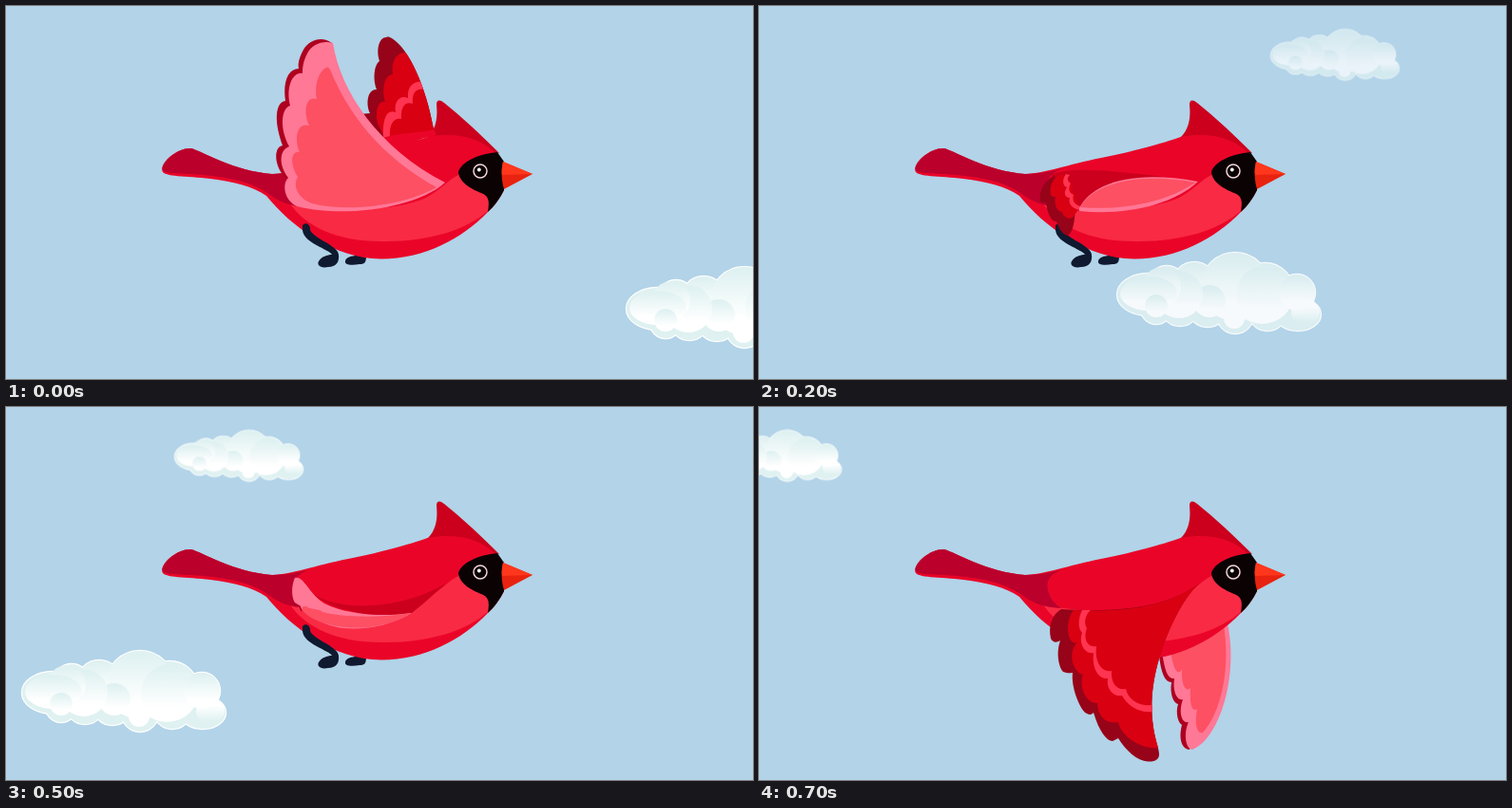
Animation, 786 px wide and 393 px high, one loop 800 ms. Source, as an HTML page without scripts:

```html
<!DOCTYPE html>
<html lang="en">
<head>
<meta charset="utf-8">
<title>Flying cardinal</title>
<style>
html, body { margin: 0; width: 100%; height: 100%; overflow: hidden; background: #b2d3e8; }
svg { display: block; width: 100vw; height: 100vh; }

.red { fill: #ea0528; }
.belly { fill: #f92a44; }
.crest { fill: #cc001d; }
.tail { fill: #bb002c; }
.navy { fill: #0f192f; }
.edge { fill: #ae001f; }
.pink { fill: #ff7896; }
.rose { fill: #fd5063; }
.tip { fill: #970318; }
.wing { fill: #d90012; }
.band { fill: #ff3450; }

/* Four wing poses, 100 ms each */
.pose { visibility: hidden; animation: flap 400ms step-end infinite; }
.up { animation-delay: -400ms; }
.fold { animation-delay: -300ms; }
.sweep { animation-delay: -200ms; }
.down { animation-delay: -100ms; }
@keyframes flap { 0% { visibility: visible; } 25%, 100% { visibility: hidden; } }

.near { animation: near 800ms step-end infinite; }
.far { animation: far 800ms step-end infinite; }
@keyframes near {
  0% { transform: translate(652px, 274px); opacity: 1; }
  12.5% { transform: translate(514px, 266px); opacity: .95; }
  25% { transform: translate(376px, 259px); opacity: .9; }
  37.5% { transform: translate(206px, 256px); opacity: 1; }
  50% { transform: translate(96px, 256px); opacity: 1; }
  62.5% { transform: translate(16px, 256px); opacity: 1; }
  75% { transform: translate(-64px, 256px); opacity: 1; }
  87.5%, 100% { transform: translate(-230px, 256px); opacity: 1; }
}
@keyframes far {
  0% { transform: translate(800px, 24px); opacity: 0; }
  12.5% { transform: translate(640px, 24px); opacity: .35; }
  25% { transform: translate(538px, 24px); opacity: .72; }
  37.5% { transform: translate(434px, 24px); opacity: 1; }
  50% { transform: translate(258px, 24px); opacity: 1; }
  62.5% { transform: translate(177px, 24px); opacity: 1; }
  75% { transform: translate(64px, 24px); opacity: 1; }
  87.5%, 100% { transform: translate(-49px, 24px); opacity: 1; }
}
</style>
</head>
<body>
<svg viewBox="0 0 786 393" preserveAspectRatio="none">
  <defs>
    <linearGradient id="puff" x2="0" y2="1">
      <stop offset=".05" stop-color="#dff1f1"/>
      <stop offset=".75" stop-color="#fff"/>
    </linearGradient>
    <linearGradient id="base" x2="0" y2="1">
      <stop offset=".3" stop-color="#fff"/>
      <stop offset=".9" stop-color="#dff1f1"/>
    </linearGradient>
    <g id="lobes">
      <ellipse cx="33" cy="45" rx="32" ry="22"/>
      <circle cx="53" cy="34" r="19"/>
      <circle cx="82" cy="34" r="23"/>
      <circle cx="125" cy="37" r="36"/>
      <circle cx="156" cy="43" r="31"/>
      <circle cx="190" cy="43" r="19"/>
      <ellipse cx="191" cy="66" rx="24" ry="17"/>
      <circle cx="42" cy="60" r="16"/>
      <circle cx="67" cy="58" r="20"/>
      <circle cx="96" cy="58" r="21"/>
      <circle cx="125" cy="67" r="19"/>
      <circle cx="159" cy="63" r="20"/>
    </g>
    <g id="cloud">
      <use href="#lobes" fill="#dff1f1" stroke="#fff" stroke-width="2.4"/>
      <use href="#lobes" fill="#dff1f1"/>
      <g fill="url(#puff)">
        <circle cx="82" cy="34" r="23"/>
        <circle cx="153" cy="44" r="32"/>
        <circle cx="125" cy="37" r="36"/>
        <circle cx="156" cy="45" r="30"/>
        <circle cx="98" cy="52" r="17"/>
        <circle cx="66" cy="45" r="25"/>
        <circle cx="48" cy="36" r="20"/>
        <ellipse cx="34" cy="44" rx="30" ry="18"/>
        <circle cx="42" cy="57" r="12"/>
      </g>
      <circle cx="124" cy="70" r="11" fill="#fff"/>
      <ellipse cx="199" cy="64" rx="15" ry="14" fill="url(#base)"/>
      <circle cx="190" cy="43" r="19" fill="url(#puff)"/>
    </g>
    <path id="raised" d="M400 33C393 33 389 45 393 58C387 62 386 78 390 88C381 87 378 102 383 113L372 114L400 142L450 132V130C442 85 424 45 406 34C404 33 402 32 400 33Z"/>
    <clipPath id="raisedClip"><use href="#raised"/></clipPath>
  </defs>

  <rect width="786" height="393" fill="#b2d3e8"/>
  <g class="far"><use href="#cloud" transform="scale(.63)"/></g>
  <g class="near"><use href="#cloud"/></g>

  <!-- far wing -->
  <g class="pose up">
    <use href="#raised" class="tip"/>
    <g clip-path="url(#raisedClip)">
      <path class="wing" d="M420 49C411 49 405 58 407 72C398 72 395 88 399 101C391 99 388 112 391 124L400 142H460V49Z"/>
      <path class="band" d="M440 80C428 78 422 85 423 97C413 93 408 103 410 112C400 108 396 120 397 139L404 138C403 123 409 117 416 119C415 105 421 100 428 103C427 92 431 86 442 88Z"/>
    </g>
  </g>
  <g class="pose down">
    <path class="edge" d="M421 262C423 280 427 290 434 290C432 302 436 312 441 313C438 322 441 333 445 335C442 346 443 360 453 361L470 300L450 245Z"/>
    <path class="pink" d="M424 258C427 278 430 287 437 286C435 300 440 310 446 308C441 322 445 334 452 332C447 342 448 360 456 361C484 350 505 285 493 228L440 240Z"/>
    <path class="rose" d="M433 256C436 278 441 284 445 276C444 290 448 302 454 296C453 312 455 322 461 318C458 335 461 345 467 343C484 325 497 280 489 230Z"/>
  </g>

  <!-- body -->
  <path class="navy" d="M357 269C357 265 364 263 369 263L379 262C379 270 378 272 372 272C362 274 356 272 357 269Z"/>
  <path class="red" d="M164.500 174C162 165 180 149 195 150C206 153 240 174 280 177C302 176 325 167 360 160C400 152 430 143 446 137C475 131 500 139 516 153L523 165L524 194C520 202 514 211 507 217C480 245 440 266.500 395 266.500C345 266.500 300 232 274 200C260 190 240 185 215 182C190 179 166 180 164.500 174Z"/>
  <path class="belly" d="M298 207C340 220 410 215 440 203C455 196 465 183 478 177L508 200L508 215C485 236 445 248 400 248C350 249 315 233 298 207Z"/>
  <path class="red" d="M298 190L304 205C330 216 385 216 420 209C440 203 452 193 463 186L440 165L340 175Z"/>
  <path class="tail" d="M164.500 172C164 163 182 149 195 150C206 153 240 174 280 177C295 177 308 174 321 171C306 175 302 183 304 193C306 201 311 208 318 212C300 211 288 207 275 197C255 183 225 179 195 177C175 176 165 176 164.500 172Z"/>
  <path class="crest" d="M444 138C454 128 454 114 453 104C453 99 456 98 461 102C480 117 502 138 519 155L514 154C500 140 475 132 444 138Z"/>
  <path d="M517 154C497 156 479 164 476 175C477 186 490 193 500 197C508 200 509 205 507 217C514 211 520 202 524 194V164Z" fill="#0b0203"/>
  <path d="M523 164L554 177L524 193C521 183 521 173 523 164Z" fill="#e8230f"/>
  <path d="M523 164L554 177L522 178C521 174 522 169 523 164Z" fill="#ff371c"/>
  <circle cx="499" cy="174" r="7" fill="#0b0203" stroke="#f3d5da" stroke-width="1.500"/>
  <circle cx="497.800" cy="172.500" r="1.900" fill="#fff"/>
  <path class="navy" d="M312 231C315 228 319 229 320 234C318 243 350 252 350 262C351 270 347 275 339 275C330 277 327 272 329 269C332 264 338 262 343 262C340 256 313 250 312 236Z"/>

  <!-- near wing -->
  <g class="pose up">
    <path class="red" d="M380 125L394 140C412 133 438 134 450 130L453 136C432 140 420 147 411 160Z"/>
    <path class="edge" d="M343 39C332 31 319 36 313 46C308 55 307 62 308 66C297 66 291 80 294 100C284 101 281 120 291 147C282 148 281 168 294 181L340 180Z"/>
    <path class="pink" d="M344 39C334 36 322 40 317 50C312 60 312 66 312 71C302 69 294 85 299 105C289 108 288 130 298 148C287 152 287 168 297 181C290 188 293 205 306 211C350 223 430 215 462 186C392 150 352 90 344 39Z"/>
    <path class="rose" d="M337 65C330 68 324 82 327 98C316 94 312 110 319 126C306 122 303 140 309 154C299 152 299 168 307 180C301 190 308 203 322 208C360 218 420 210 453 191C408 166 366 128 341 67C340 65 338 64 337 65Z"/>
  </g>
  <g class="pose fold">
    <path class="crest" d="M318 193C345 216 410 216 463 186C450 197 440 207 427 217C390 225 340 215 318 193Z"/>
    <path class="pink" d="M304 180C313 177 318 196 335 207C360 220 400 221 427 217C405 230 380 235 355 233C335 231 315 218 309 211C299 206 300 188 304 180Z"/>
    <path class="rose" d="M427 217C390 223 352 221 333 216C330 212 320 214 316 210C308 209 311 217 325 224C350 236 395 237 427 217Z"/>
    <path d="M302 206L309 210L311 215" fill="none" stroke="#ae001f" stroke-width="1.500"/>
  </g>
  <g class="pose sweep">
    <path class="crest" d="M308 177C335 169 370 174 410 178L462 185L440 201L337 216L312 205Z"/>
    <path class="tip" d="M310 179C300 184 294 196 296 206C299 208 301 207 302 207C303 218 308 228 313 227C316 236 320 241 325 242C331 237 332 227 333 212L322 188Z"/>
    <path class="wing" d="M318 177C309 181 305 190 307 199C309 202 311 201 312 201C310 210 314 217 319 217C320 222 325 225 330 223L337 213L327 184Z"/>
    <path class="band" d="M323 177C319 182 319 190 324 191C320 197 322 202 327 202C325 208 329 213 337 215L339 211C332 210 329 205 331 199C326 197 325 192 328 187C324 184 324 181 327 178Z"/>
    <path class="pink" d="M337 213C350 188 390 172 462 185C435 210 385 221 337 216Z"/>
    <path class="rose" d="M338 212C350 189 395 174 459 186C430 206 385 216 338 212Z"/>
  </g>
  <g class="pose down">
    <path class="tip" d="M318 213C309 218 304 230 307 244C310 249 313 248 317 246C312 260 316 275 320 279C325 281 328 280 330 280C328 295 338 320 345 323C348 325 350 324 352 322C358 342 366 352 372 352L378 349C386 362 398 373 409 373.500C417 374 421 371 421 366C421 360 418 355 417 348C412 325 411 300 421 265C430 235 445 203 463 186C430 211 380 217 318 213Z"/>
    <path class="wing" d="M331 214C324 222 323 240 329 247C331 249 333 249 335 247C323 262 332 280 341 282C336 294 344 313 356 312C356 325 365 335 378 332C380 345 400 361 420 359L417 348C412 325 411 300 421 265C430 235 445 203 463 186C430 211 380 217 331 214Z"/>
    <path class="band" d="M340 214C336 222 335 233 340 238C336 249 343 261 352 259C350 275 357 287 367 286C365 298 374 306 382 304C387 314 400 323 414 321L414 314C400 316 388 308 386 297C376 299 370 290 371 278C360 280 353 268 355 252C345 254 341 243 345 233C341 227 344 218 349 214Z"/>
  </g>
</svg>
</body>
</html>
```
